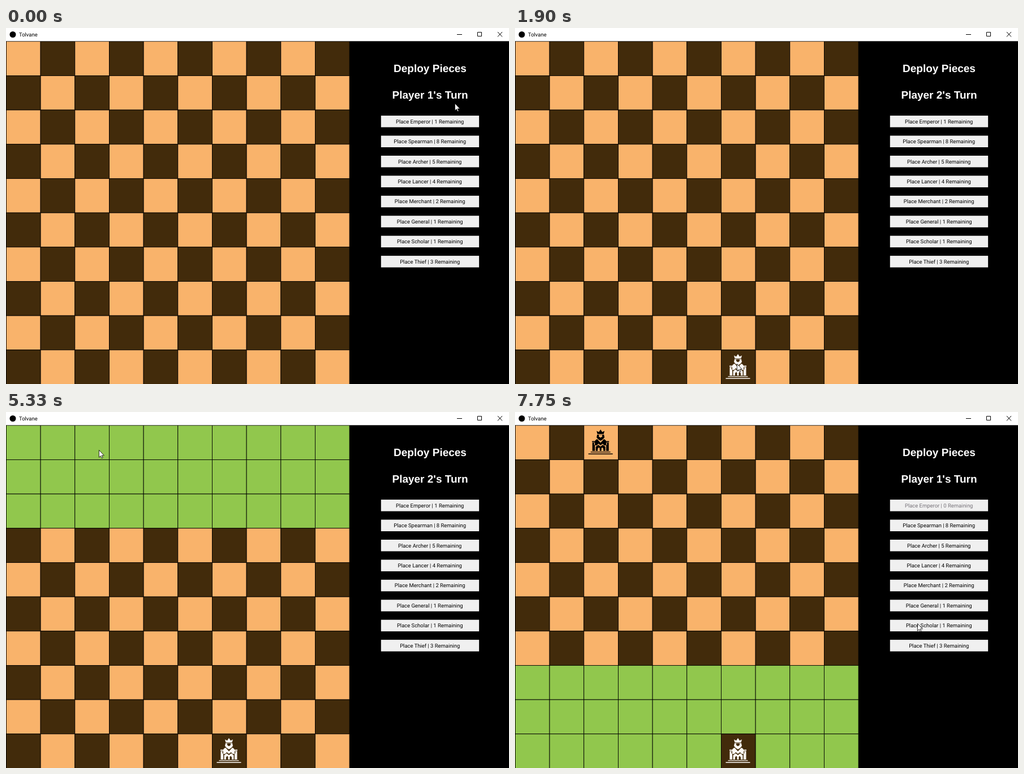
Recreate the animation shown at these times as an HTML page. Size 889 px wide and 630 px high, loop 8000 ms.

```html
<!DOCTYPE html>
<html lang="en">
<head>
<meta charset="utf-8">
<title>Tolvane</title>
<style>
  html, body { margin: 0; width: 100%; height: 100%; overflow: hidden; background: #000; }
  svg { display: block; width: 889px; height: 630px; text-rendering: geometricPrecision; }
  .ui { font: 9.45px Roboto, "Open Sans", sans-serif; }
  .head { font: bold 19px "Liberation Sans", Arial, sans-serif; fill: #fff; }
  .mid { text-anchor: middle; }
  #board rect { stroke: #000; stroke-width: .87; }
</style>
</head>
<body>
<svg id="stage" viewBox="0 0 889 630">
  <defs>
    <path id="emperor" fill-rule="evenodd" d="
      M14.5 2.5l4 2 3-4.5 3 4.5 4-2L27 8H16z
      M15.5 9h12l1 5-3 3.5-4 2.5-4-2.5-3-3.5z M18.5 9.5h6v3l-3 2-3-2z
      M10 27c0-6 2.5-9 5.5-10l6 6.5 6-6.5c3 1 5.5 4 5.5 10l-4.5 1.5-3.2-3.5-3.8 3-3.8-3-3.2 3.5z
      M13 38v-7.5l4.5-3.5 4 3.3 4-3.3 4.5 3.5V38h-3.5v-4l-2-2.5-1.5 2V38h-3v-4.5l-1.5-2-2 2.5v4z
      M6.5 20.5h4.5v2H6.5z M7 23.3h4.5V38H7z
      M32 20.5h4.5v2H32z M31.5 23.3H36V38h-4.5z
      M4 39.3h35v1.3H4z M0 42.4h43v1.5H0z"/>
  </defs>
  <g id="board"></g>
  <rect width="889" height="23.3" fill="#fff"/>
  <circle cx="12" cy="11.5" r="5.5"/>
  <text class="ui" x="23" y="15">Tolvane</text>
  <path d="M797 11.5h9M833.5 7.5h7v7h-7zM869 7l8 8.5M877 7l-8 8.5" fill="none" stroke="#000"/>
  <text class="head mid" x="749.5" y="78">Deploy Pieces</text>
  <text class="head mid" x="749.5" y="125" id="turn"></text>
  <g id="buttons"></g>
  <use id="white" href="#emperor" x="372.5" y="577" fill="#fdfaf6"/>
  <use id="black" href="#emperor" x="129.7" y="31"/>
  <path id="cursor" d="M.4.4V13.3L3.3 10.6 5.2 14.8 7.1 14 5.2 9.9H9.3Z"
        fill="#fff" stroke="#000" stroke-width=".8"/>
</svg>
<script>
const LOOP = 8000, N = 10, CELL = 60.67;
const LIGHT = '#f9b36b', DARK = '#422b0b', GREEN = '#91c74d';
const $ = id => document.getElementById(id);

function add(parent, tag, attrs, text = '') {
  const el = document.createElementNS('http://www.w3.org/2000/svg', tag);
  for (const k in attrs) el.setAttribute(k, attrs[k]);
  el.textContent = text;
  return parent.appendChild(el);
}

const cells = Array.from({ length: N * N }, (_, i) => add($('board'), 'rect', {
  x: 0.43 + CELL * (i % N), y: 23.73 + CELL * Math.floor(i / N), width: CELL, height: CELL
}));

const units = { Emperor: 1, Spearman: 8, Archer: 5, Lancer: 4, Merchant: 2, General: 1, Scholar: 1, Thief: 3 };
const label = (name, count) => `Place ${name} | ${count} Remaining`;
const labels = Object.entries(units).map(([name, count], i) => {
  const y = 155.1 + 35.43 * i;
  add($('buttons'), 'rect', { x: 662.8, y, width: 173.3, height: 20.5, fill: '#f0f0f0' });
  return add($('buttons'), 'text', { class: 'ui mid', x: 749.2, y: y + 13.6 }, label(name, count));
});

const easeOut = p => 1 - (1 - p) ** 2;
const easeBoth = p => p ** 3 * (10 - 15 * p + 6 * p * p);

// Each leg is a Bezier curve from where the last one ended, walked in timed hops
const home = [793, 133];
const legs = [
  { start: 140, gap: 130, hops: 4, ease: easeOut, path: [[760, 145], [690, 165], [717, 163]] },
  { start: 1080, gap: 142, hops: 5, ease: easeBoth, path: [[103, 300], [453, 519], [392, 594]] },
  { start: 2180, gap: 127, hops: 7, ease: easeBoth, path: [[607, 155], [450, 92], [719, 158]] },
  { start: 3210, gap: 134, hops: 6, ease: easeOut, path: [[652, 125], [892, 79], [717, 163]] },
  { start: 4460, gap: 124, hops: 8, ease: easeOut, path: [[500, 222], [220, 160], [164, 67]] },
  { start: 6540, gap: 150, hops: 1, ease: easeOut, path: [[164, 67], [184, 73], [184, 73]] },
  { start: 6690, gap: 135, hops: 7, ease: easeOut, path: [[719, 148], [540, 338], [711, 374]] }
];

function pointer(t) {
  const i = legs.findLastIndex(leg => leg.start <= t);
  if (i < 0) return home;
  const { start, gap, hops, ease, path: [b, c, d] } = legs[i];
  const a = i ? legs[i - 1].path[2] : home;
  const hop = Math.min(hops, Math.floor((t - start) / gap) + 1);
  const u = ease(hop / hops), v = 1 - u;
  return a.map((_, k) =>
    v ** 3 * a[k] + 3 * v * v * u * b[k] + 3 * v * u * u * c[k] + u ** 3 * d[k]);
}

// A turn starts at `from`; picking a piece at `pick` lights three rows from `top`
const turns = [
  { from: 0, pick: 680, player: 1, top: 7 },
  { from: 1900, pick: 4160, player: 2, top: 0 },
  { from: 6020, pick: 7750, player: 1, top: 7 }
];

function showTurn(t) {
  const placed = turns.findLastIndex(turn => turn.from <= t);
  const { pick, player, top } = turns[placed];
  cells.forEach((cell, i) => {
    const r = Math.floor(i / N), c = i % N;
    const taken = placed > 0 && r === 9 && c === 6;
    const lit = t >= pick && r >= top && r < top + 3 && !taken;
    cell.setAttribute('fill', lit ? GREEN : (r + c) % 2 ? DARK : LIGHT);
  });
  $('turn').textContent = `Player ${player}'s Turn`;
  $('white').style.display = placed > 0 ? '' : 'none';
  $('black').style.display = placed > 1 ? '' : 'none';
  labels[0].textContent = label('Emperor', placed > 1 ? 0 : 1);
  labels[0].setAttribute('fill', placed > 1 ? '#77737a' : '#000');
}

function draw() {
  const t = performance.now() % LOOP;
  showTurn(t);
  $('cursor').setAttribute('transform', `translate(${pointer(t).map(Math.round)})`);
  requestAnimationFrame(draw);
}
draw();
</script>
</body>
</html>
```
